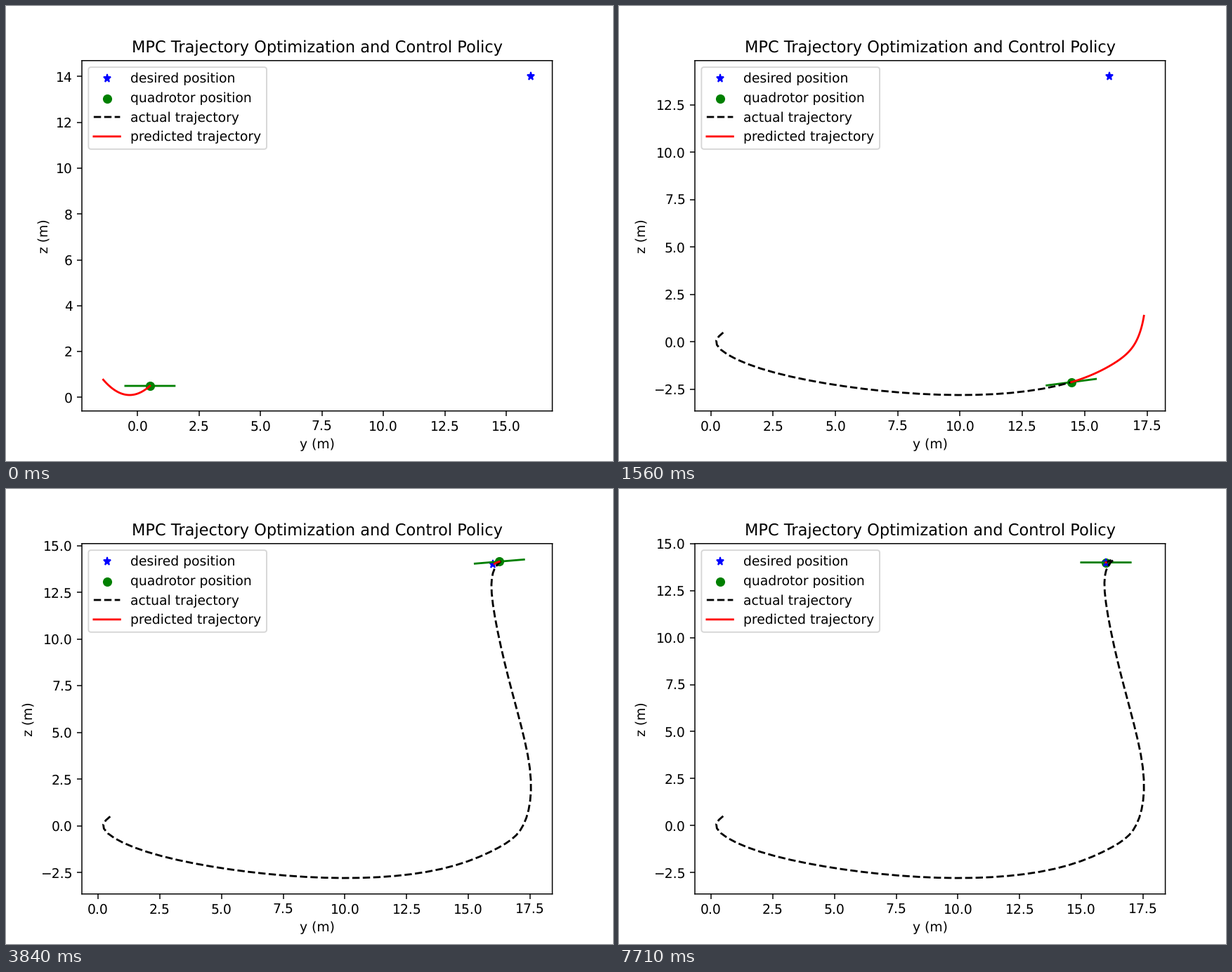
A matplotlib script for the animation above (8 s loop, 864 px wide and 648 px high).

```python
import numpy as np
import matplotlib.pyplot as plt
from matplotlib.animation import FuncAnimation

LOOP_MS, INTERVAL, STEP_MS = 8000, 40, 60
HORIZON = 11   # steps looked ahead
PULL = 0.04    # how far a plan leans towards the goal
GOAL = np.array([16.0, 14.0])

# Flight path: step, y, z
WAYPOINTS = np.array([
    (0, 0.5, 0.5), (2, 0.22, 0.08), (4, 0.4, -0.4), (8, 2.0, -1.4),
    (12, 4.6, -2.18), (18, 9.17, -2.78), (26, 14.46, -2.12),
    (30, 16.2, -1.18), (35, 17.23, 0.07), (41, 17.48, 3.1),
    (47, 16.63, 7.85), (53, 15.94, 12.45), (57, 16.05, 13.75),
    (61, 16.28, 14.13), (66, 16.18, 14.12), (75, 16.05, 14.03),
    (95, 16, 14), (150, 16, 14)])

# Roll angle: step, radians
ROLL = np.array([(0, 0), (3, -0.6), (18, 0.07), (26, 0.17), (32, 0.45),
                 (41, 0.1), (52, -0.4), (64, 0.11), (76, 0)])


def natural_spline(keys, steps):
    """Natural cubic spline through the keys."""
    t, p = keys[:, 0], keys[:, 1:]
    h = np.diff(t)
    slope = np.diff(p, axis=0) / h[:, None]
    system = np.eye(len(t))
    rhs = np.zeros_like(p)
    for j in range(1, len(t) - 1):
        system[j, j - 1:j + 2] = h[j - 1], 2 * (h[j - 1] + h[j]), h[j]
        rhs[j] = 6 * (slope[j] - slope[j - 1])
    bend = np.linalg.solve(system, rhs)

    i = np.clip(np.searchsorted(t, steps, side="right") - 1, 0, len(h) - 1)
    gap = h[i][:, None]
    b = (steps - t[i])[:, None] / gap
    a = 1 - b
    return (a * p[i] + b * p[i + 1]
            + ((a ** 3 - a) * bend[i] + (b ** 3 - b) * bend[i + 1])
            * gap ** 2 / 6)


def predict(step):
    u = np.linspace(0, 1, 40)
    if step == 0:
        # The first guess keeps drifting backwards along a parabola.
        return np.column_stack([0.5 - 1.9 * u, 0.5 - 1.83 * u + 2.1 * u ** 2])
    plan = natural_spline(WAYPOINTS, step + HORIZON * u)
    return plan + PULL * u[:, None] ** 2 * (GOAL - plan[-1])


def padded(values):
    low, high = values.min(), values.max()
    pad = 0.05 * (high - low)
    return low - pad, high + pad


PATH = natural_spline(WAYPOINTS, np.arange(LOOP_MS // STEP_MS + 2))

plt.rcParams.update({"font.family": "DejaVu Sans", "text.hinting": "none",
                     "path.snap": False})
fig, ax = plt.subplots(figsize=(6.4, 4.8), dpi=135)
ax.plot(*GOAL, "b*", label="desired position")
quad = ax.scatter(*PATH[0], color="green", label="quadrotor position")
body, = ax.plot([], [], color="green")
actual, = ax.plot([], [], "k--", label="actual trajectory")
predicted, = ax.plot([], [], "r", label="predicted trajectory")
ax.set_title("MPC Trajectory Optimization and Control Policy")
ax.set_xlabel("y (m)")
ax.set_ylabel("z (m)")
ax.legend(loc="upper left")


def update(frame):
    step = int(frame * INTERVAL / STEP_MS + 0.5)
    trail = PATH[:step + 1]
    pos = trail[-1]
    roll = np.interp(step, *ROLL.T)
    arm = np.array([np.cos(roll), np.sin(roll)])
    bar = np.array([pos - arm, pos + arm])
    plan = predict(step)

    quad.set_offsets([pos])
    for line, points in ((body, bar), (actual, trail), (predicted, plan)):
        line.set_data(*points.T)

    everything = np.vstack([trail, bar, plan, [GOAL]])
    ax.set_xlim(*padded(everything[:, 0]))
    ax.set_ylim(*padded(everything[:, 1]))
    return quad, body, actual, predicted


anim = FuncAnimation(fig, update, frames=LOOP_MS // INTERVAL,
                     interval=INTERVAL, repeat=True, repeat_delay=0,
                     blit=False)
plt.show()
```
